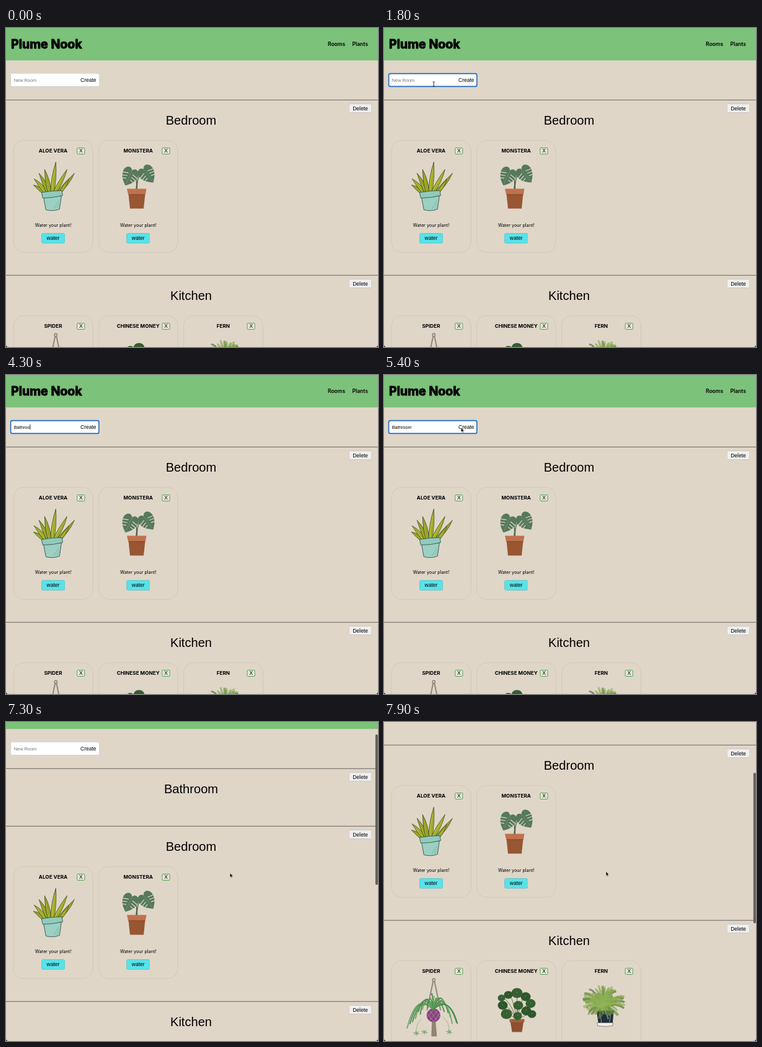
Animation, 600 px wide and 515 px high, one loop 8000 ms. Source, as an HTML page:

```html
<!DOCTYPE html>
<html lang="en">
<head>
<meta charset="utf-8">
<title>Plant rooms</title>
<style>
html, body { margin: 0; width: 100%; height: 100%; overflow: hidden; background: #dfd6c8; }
svg { display: block; }
text { font-family: "Liberation Sans", Arial, sans-serif; font-size: 8.5px; }
.mid { text-anchor: middle; }
.ui { font-family: Inter, sans-serif; }
.brand { font: 700 19.6px Inter, sans-serif; stroke: #000; stroke-width: 1; stroke-linejoin: round; }
.nav { font-weight: 600; }
.head { font-size: 20.1px; }
.name { font-size: 8.2px; font-weight: 700; }
.note { font-size: 7.25px; }
.field { font-size: 7.4px; }
.btn { filter: drop-shadow(0 .5px .6px rgba(0,0,0,.5)); }
.card { fill: #dfd6c8; stroke: #d5ccbe; stroke-width: .7; filter: drop-shadow(0 .7px .7px rgba(0,0,0,.16)); }

.anim { animation: 8s -15ms step-end infinite; }
#page { animation-name: scroll; }
#thumb { animation-name: thumb; }
#rest { animation-name: shift; }
#fresh { animation-name: fresh; }
#ring { animation-name: ring; }
#hint { animation-name: hint; }
#cover { animation-name: type; }
#caret { animation-name: blink; }
#ibeam { animation-name: ibeam; }
#arrow { animation-name: arrow; animation-timing-function: ease-in-out; }
#arrowShow { animation-name: arrowShow; }

@keyframes scroll {
  0% { transform: translateY(0); }
  88.75% { transform: translateY(-6px); }
  90% { transform: translateY(-20px); }
  91.25% { transform: translateY(-41px); animation-timing-function: steps(6); }
  98.75%, 100% { transform: translateY(-172px); }
}
@keyframes thumb {
  0% { transform: translateY(1px); opacity: 0; }
  88.75% { transform: translateY(3px); opacity: 1; }
  90% { transform: translateY(10px); opacity: 1; }
  91.25% { transform: translateY(20px); opacity: 1; animation-timing-function: steps(6); }
  98.75%, 100% { transform: translateY(82px); opacity: 1; }
}
@keyframes shift { 0% { transform: none; } 71.25%, 100% { transform: translateY(93px); } }
@keyframes fresh { 0% { opacity: 0; } 71.25%, 100% { opacity: 1; } }
@keyframes ring { 0% { opacity: 0; } 16.25% { opacity: 1; } 71.25%, 100% { opacity: 0; } }
@keyframes hint { 0% { opacity: 1; } 38.75% { opacity: 0; } 71.25%, 100% { opacity: 1; } }
@keyframes type {
  0% { transform: none; }
  38.75% { transform: translateX(4.9px); }
  42.5% { transform: translateX(9px); }
  45% { transform: translateX(11.1px); }
  47.5% { transform: translateX(15.2px); }
  48.75% { transform: translateX(17.7px); }
  51.25% { transform: translateX(21.8px); }
  52.5% { transform: translateX(25.9px); }
  57.5% { transform: translateX(32.1px); }
  71.25%, 100% { transform: none; }
}
@keyframes blink {
  0% { opacity: 0; } 16.25% { opacity: 1; } 21.25% { opacity: 0; } 27.5% { opacity: 1; }
  33.75% { opacity: 0; } 38.75% { opacity: 1; } 63.75% { opacity: 0; } 100% { opacity: 0; }
}
@keyframes ibeam { 0% { opacity: 0; } 15% { opacity: 1; } 38.75%, 100% { opacity: 0; } }
@keyframes arrowShow {
  0% { opacity: 0; } 13.75% { opacity: 1; } 15% { opacity: 0; } 65%, 100% { opacity: 1; }
}
@keyframes arrow {
  0%, 13.75% { transform: translate(110px, 150px); }
  15%, 65% { transform: translate(80px, 90px); }
  68.75%, 72.5% { transform: translate(133px, 84px); }
  78.75%, 88.75% { transform: translate(362px, 246.6px); }
  91.25% { transform: translate(361.3px, 243.8px); animation-timing-function: linear; }
  98.75%, 100% { transform: translate(358px, 241.3px); }
}
</style>
</head>
<body>
<svg width="600" height="515" viewBox="0 0 600 515">
  <rect width="600" height="515" fill="#dfd6c8"/>
  <g id="page" class="anim">
    <rect width="600" height="52.3" fill="#7cc27a"/>
    <text class="brand" x="8" y="33.3">Plume Nook</text>
    <text class="ui nav" x="519" y="29.4">Rooms</text>
    <text class="ui nav" x="558.5" y="29.4">Plants</text>

    <rect class="btn" x="7.5" y="73.3" width="142.5" height="21.2" rx="2.5" fill="#fff"/>
    <text class="field" x="12.7" y="86.6">Bathroom</text>
    <g id="cover" class="anim">
      <rect x="12.5" y="77" width="40" height="14" fill="#fff"/>
      <rect id="caret" class="anim" x="12.6" y="79.6" width=".8" height="8.4"/>
    </g>
    <text id="hint" class="field anim" x="12.7" y="86.6" fill="#757575">New Room</text>
    <text x="120" y="86.8">Create</text>
    <rect id="ring" class="anim" x="7.6" y="73.6" width="142.2" height="20.8" rx="2.5" fill="none" stroke="#2268bd" stroke-width="1.6"/>

    <g id="fresh" class="anim"></g>
    <g id="rest" class="anim"></g>
  </g>

  <g id="thumb" class="anim"><rect x="595.8" width="4" height="243" rx="2" fill="#655f58"/></g>
  <path d="M0 511Q0 515 4 515H0ZM600 511Q600 515 596 515H600Z" fill="#1c1c1c"/>
  <g id="ibeam" class="anim">
    <path d="M78.6 86.6Q80.3 86.6 80.3 88Q80.3 86.6 82 86.6M80.3 88V93.4M78.6 94.6Q80.3 94.6 80.3 93.2Q80.3 94.6 82 94.6" fill="none" stroke="#222" stroke-width=".9"/>
  </g>
  <g id="arrowShow" class="anim">
    <g id="arrow" class="anim">
      <path d="M0 0V7.2L1.6 5.7L2.7 8.3L3.9 7.8L2.8 5.3H5Z" stroke="#fff" stroke-width=".5"/>
    </g>
  </g>
</svg>

<script>
const TAU = Math.PI * 2;
let seed = 7;
const rand = (a, b) => {
  seed = (seed * 16807) % 2147483647;
  return a + (b - a) * seed / 2147483647;
};
const times = (n, fn) => Array.from({ length: n }, (_, i) => fn(i)).join('');
const path = (d, attrs) => `<path d="${d}" ${attrs}/>`;
const line = (d, color, width, more = '') =>
  path(d, `fill="none" stroke="${color}" stroke-width="${width}" ${more}`);

// Pointed leaf from a base to a tip; bend pushes its middle sideways.
function blade(x, y, tx, ty, w, bend, attrs) {
  const len = Math.hypot(tx - x, ty - y);
  const nx = (y - ty) / len, ny = (tx - x) / len;
  const at = k => `${(x + tx) / 2 + nx * k} ${(y + ty) / 2 + ny * k}`;
  return path(`M${x + nx * w / 2} ${y + ny * w / 2}Q${at(bend + w)} ${tx} ${ty}` +
    `Q${at(bend - w)} ${x - nx * w / 2} ${y - ny * w / 2}Z`, attrs);
}

function aloe() {
  const ink = 'stroke="#39431c" stroke-width=".8" stroke-linejoin="round"';
  const tips = [
    [50, 32, 72, 4, 2], [53, 33, 62, 4.5, 2], [70, 98, 53, 4.5, 2], [65, 86, 47, 4.5, 1],
    [56, 41, 53, 4.5, 2], [62, 68, 35, 5, 0], [58, 50, 47, 5, 1], [73, 89, 62, 3.5, 2]
  ];
  return tips.map(([x, tx, ty, w, bend], i) =>
    blade(x, 86, tx, ty, w, bend, `fill="${i % 2 ? '#b4bd32' : '#a2ae2c'}" ${ink}`) +
    blade(x + 1, 86, tx, ty, w / 5, bend, 'fill="#8a9a28"')).join('') +
    path('M48 90L52 112Q63 115 74 111L77 90Z', 'fill="#9bd0c2" stroke="#39544d" stroke-width=".9"') +
    path('M45 84Q61 81 78 81L79 89Q63 93 47 93Z', 'fill="#91cabb" stroke="#39544d" stroke-width=".9"') +
    line('M65 110L73 98M69 110L74 103', '#6fa99b', .7);
}

function heartLeaf(x, y, turn, size) {
  const cuts = times(3, i => {
    const v = -4 + i * 5.5;
    return line(`M4 ${v}L15 ${v + 3}M-4 ${v}L-15 ${v + 3}`, '#dfd6c8', 1.4);
  });
  return `<g transform="translate(${x} ${y}) rotate(${turn}) scale(${size})">` +
    path('M0 -11C5 -20 16 -14 15 -3C14 8 7 14 0 20C-7 14 -14 8 -15 -3C-16 -14 -5 -20 0 -11Z', 'fill="#56795b"') +
    cuts + line('M0 -11V17', '#87a186', .6) + '</g>';
}

function monstera() {
  return line('M60 80Q64 62 55 50M62 80Q61 58 71 49', '#48644a', 1.3) +
    heartLeaf(50, 57, 24, .86) + heartLeaf(78, 54, -36, .86) +
    path('M48 86H75L72.5 110H50.5Z', 'fill="#985633"') +
    path('M45.5 78H77L75.5 87H47.5Z', 'fill="#c0724d"') +
    line('M48 87.4H75', '#7f4529', .9);
}

function spider() {
  const leaves = times(24, i => {
    const t = i / 11.5 - 1;
    const x = 67 + t * 39 + rand(-3, 3);
    const y = 58 + Math.abs(t) * 42 + rand(-8, 10);
    return line(`M67 79Q${67 + t * 26} ${46 + rand(-4, 14)} ${x} ${y}`,
      i % 3 ? '#4a8d4d' : '#72a566', 1.8, 'stroke-linecap="round"');
  });
  const baby = (x, y) => times(6, i => {
    const a = i * TAU / 6 + .3;
    return line(`M${x} ${y}l${5 * Math.cos(a)} ${4 * Math.sin(a)}`, '#5b9a55', 1);
  });
  return line('M67 33L57 80M69 33L79 80', '#93887a', 2) +
    `<circle cx="68" cy="31" r="2.2" fill="none" stroke="#8a7e70" stroke-width="1.4"/>` +
    path('M65 98H71L73 122H64Z', 'fill="#93836f"') +
    `<circle cx="67.5" cy="88" r="11" fill="#87427f"/>` +
    line('M57 84L68 99L78 84M57 92L68 78L78 92M61 97L74 80M74 97L61 80', '#b697a5', .7) +
    leaves + line('M48 94Q38 104 40 117M82 90Q94 100 93 115', '#74a568', .6) +
    baby(40, 117) + baby(53, 115) + baby(93, 115);
}

function money() {
  const discs = [
    [65, 52, 9], [51, 55, 7], [40, 60, 6], [79, 58, 8], [87, 69, 8], [42, 72, 8],
    [67, 72, 8], [80, 81, 8], [48, 86, 9], [89, 86, 7], [66, 89, 7]
  ];
  return path('M54 96H76L73 115H57Z', 'fill="#8f5033"') +
    path('M53 94H77V99H53Z', 'fill="#a5613f"') +
    discs.map(([x, y]) => line(`M65 97Q${(x + 65) / 2} ${y} ${x} ${y}`, '#577143', .9)).join('') +
    discs.map(([x, y, r], i) =>
      `<ellipse cx="${x}" cy="${y}" rx="${r}" ry="${r * .9}" fill="${i % 2 ? '#2e572c' : '#365f31'}"/>` +
      `<circle cx="${x}" cy="${y - 1}" r=".7" fill="#8aa56c"/>`).join('');
}

function fern() {
  const greens = ['#4d7030', '#688f38', '#7fa346', '#92b457'];
  const fronds = times(84, i => {
    const a = i * 2.4, r = rand(14, 37);
    const dx = Math.cos(a) * r, dy = Math.sin(a) * r * .78;
    return line(`M66 74Q${66 + dx * .6} ${60 + dy * .7} ${66 + dx} ${67 + dy}`,
      greens[Math.floor(i / 21)], rand(2.5, 4.5), 'stroke-dasharray="1.2 .6"');
  });
  return path('M56 80H84L82 101H59Z', 'fill="#202e3d"') +
    path('M57 100H83L82 105Q70 107 58 105Z', 'fill="#f0eee8" stroke="#4a4a46" stroke-width=".6"') +
    line('M62 85L64 100M79 85L77 100', '#8796a0', 1) + fronds;
}

function card(i, name, plant) {
  return `<g transform="translate(${12.3 + 137.2 * i} 181.5)">
    <rect class="card" width="127.5" height="180.5" rx="16"/>
    <text class="ui name mid" x="63.7" y="19.7">${name}</text>
    <rect x="102.4" y="12" width="12.2" height="10" rx="1.2" fill="#e8e4da" stroke="#55a753" stroke-width="1"/>
    <text class="mid" x="108.6" y="19.8">X</text>
    ${plant()}
    <text class="ui note mid" x="63.7" y="139.4">Water your plant!</text>
    <rect class="btn" x="44.9" y="149.9" width="37.6" height="16.2" rx="2.5" fill="#56e3e9"/>
    <text class="mid" x="63.7" y="160.6">water</text>
  </g>`;
}

function room(y, title, plants) {
  return `<g transform="translate(0 ${y})">
    <rect y="115.8" width="600" height=".7" fill="#333"/>
    <rect class="btn" x="553.3" y="122.4" width="36.4" height="14" rx="2" fill="#efefef"/>
    <text class="mid" x="571.5" y="132.5">Delete</text>
    <text class="head mid" x="298.5" y="155.8">${title}</text>
    ${plants.map(([name, plant], i) => card(i, name, plant)).join('')}
  </g>`;
}

document.getElementById('fresh').innerHTML = room(0, 'Bathroom', []);
document.getElementById('rest').innerHTML =
  room(0, 'Bedroom', [['ALOE VERA', aloe], ['MONSTERA', monstera]]) +
  room(283, 'Kitchen', [['SPIDER', spider], ['CHINESE MONEY', money], ['FERN', fern]]);
</script>
</body>
</html>
```
